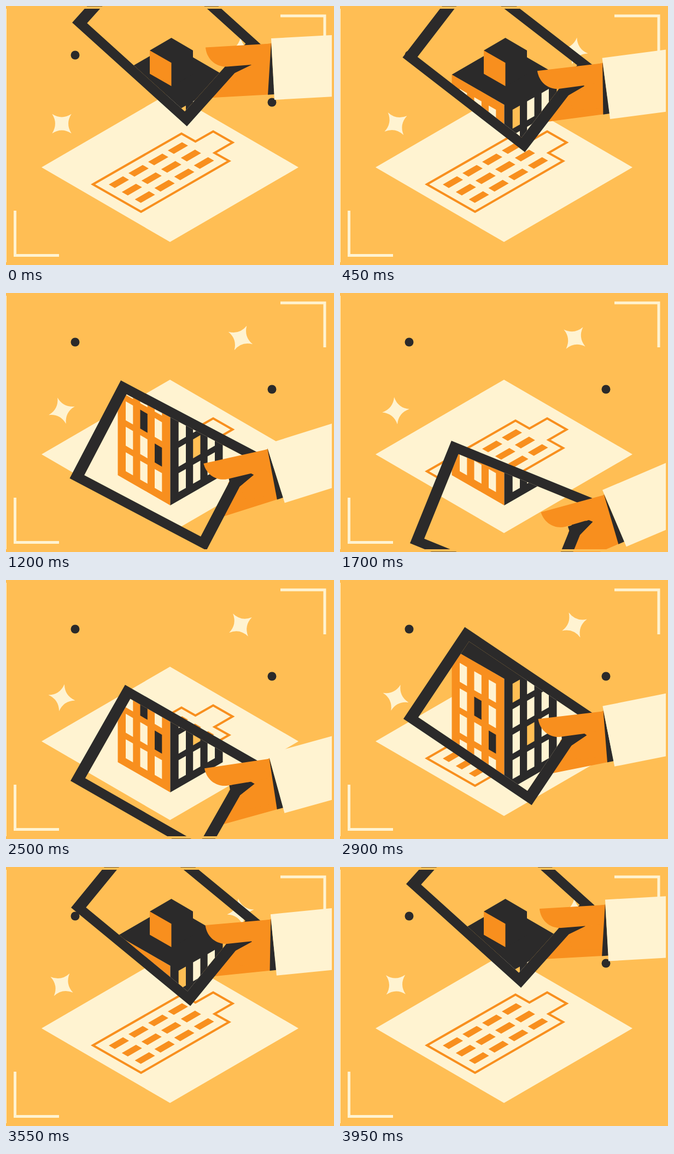
Recreate the animation shown at these times as an HTML page. Size 600 by 472 pixels, loop 4000 ms.

```html
<!DOCTYPE html>
<html lang="en">
<head>
<meta charset="utf-8">
<title>Building in a tablet</title>
<style>
  html, body { margin: 0; width: 100%; height: 100%; overflow: hidden; background: #ffbe54; }
  svg { display: block; width: 600px; height: 472px; }
  .sun { fill: #ffbe54; }
  .cream { fill: #fff3d1; }
  .orange { fill: #f88f1e; }
  .dark { fill: #2b2a2a; }
  .line { fill: none; stroke: #f88f1e; stroke-width: 4; }
  .bracket { fill: none; stroke: #fff3d1; stroke-width: 5; }
</style>
</head>
<body>
<svg viewBox="0 0 600 472">
  <defs>
    <clipPath id="stage"><rect width="596" height="472"/></clipPath>
    <clipPath id="lens"><rect id="lensBox" x="21" y="-184" width="240.5" height="166.5"/></clipPath>
  </defs>
  <rect class="sun" width="600" height="472"/>
  <rect class="cream" y="5" width="1" height="462"/>
  <path class="bracket" d="M502 18H583V99"/>
  <path class="bracket" d="M16.5 373V454.5H97"/>

  <polygon class="cream" points="65,294 300,158 535,294 300,430"/>
  <polygon class="line" points="159,325 321,232.5 346.5,247 379,228.5 414.5,248.7 381.5,267.7 408,282.5 247,375"/>
  <g id="plan" class="orange"></g>

  <g clip-path="url(#lens)">
    <rect class="sun" width="600" height="472"/>
    <polygon class="cream" points="65,294 300,158 535,294 535,301.5 300,437.5 65,301.5"/>
    <polygon class="orange" points="204.5,125 300.5,180 300.5,387 204.5,332"/>
    <polygon class="dark" points="204.5,125 300.5,69.5 396.5,125 396.5,332 300.5,387 300.5,180"/>
    <polygon class="dark" points="263,81 302.5,58 342,81 342,124 302.5,147 263,124"/>
    <polygon class="orange" points="263,81 302.5,103.5 302.5,146 263,123.5"/>
    <g id="panes"></g>
  </g>

  <circle class="dark" cx="126.5" cy="89.5" r="8"/>
  <circle class="dark" cx="486.5" cy="175.5" r="8"/>
  <path id="starLeft" class="cream"/>
  <path id="starRight" class="cream"/>

  <g clip-path="url(#stage)">
    <g id="tablet">
      <g transform="rotate(-42) translate(-121 -30.3)">
        <polygon class="orange" points="485,68 440,75 400,110 374,167.3 480,161.5 488,150"/>
      </g>
      <path class="dark" fill-rule="evenodd"
        d="M0 0V-201.5H282.5V0ZM21 -17.5H261.5V-184H21Z"/>
      <g transform="rotate(-42) translate(-121 -30.3)">
        <polygon class="dark" points="403,100 443,102 449,107.5 418,122.5 402,128"/>
        <polygon class="orange" points="449,107.5 418,122.5 425,150 486,150 486,68 455,85"/>
        <path id="thumb" class="orange" d="M365 75.5C367 97 384 111.5 404 110.5L449 107L485 103V68.5Z"/>
        <polygon class="dark" points="485,66 491,161 479,161.7"/>
        <polygon class="cream" points="485,59 800,41.8 800,154.2 491,171"/>
      </g>
    </g>
  </g>
  <rect class="sun" x="1" y=".6" width="599" height="4.4"/>
  <rect class="sun" x="1" y="467" width="599" height="4.4"/>
</svg>
<script>
const LOOP = 4000, STEP = 50, SLOPE = 0.5745;

// time, x and y of the tablet's lower left corner, tablet angle, thumb lift
const keys = [
  [0, 121, 30.3, 42, 0],
  [550, 113, 115, 36.4, 1.4],
  [800, 112, 195, 33, 2.6],
  [1100, 114.5, 309.5, 28.9, 4.6],
  [1700, 128, 456, 22.1, 8],
  [1900, 130, 467, 21.8, 8.6],
  [2100, 128, 455, 23.6, 8.7],
  [2300, 122.5, 418, 26.8, 8.2],
  [2500, 118, 366, 29.7, 7.3],
  [2900, 116, 253, 33.85, 4.8],
  [3300, 117, 129.5, 37.4, 2],
  [3550, 119, 74, 39.4, 1]
];

const byId = id => document.getElementById(id);

function addPolygon(parent, points, kind) {
  const shape = document.createElementNS("http://www.w3.org/2000/svg", "polygon");
  shape.setAttribute("points", points.map(p => p.join()).join(" "));
  if (kind) shape.setAttribute("class", kind);
  parent.append(shape);
}

function drawPlan() {
  const a = 13, b = 5.5;
  for (let row = 0; row < 3; row++) {
    for (let col = 0; col < 4; col++) {
      const cx = 206.5 + 36 * col + 23.8 * row;
      const cy = 321 - 20.7 * col + 13.6 * row;
      const corner = (u, v) => [cx + u + v, cy + (v - u) * SLOPE];
      addPolygon(byId("plan"), [corner(-a, -b), corner(a, -b), corner(a, b), corner(-a, b)]);
    }
  }
}

function drawPanes() {
  const leftDark = ["1,1", "2,2"], rightLit = ["2,0", "1,2"];
  for (let row = 0; row < 4; row++) {
    for (let col = 0; col < 3; col++) {
      const x = 219 + 26.5 * col, w = 13.3, h = 34.5;
      const y = 151 + 46.4 * row + 26.5 * SLOPE * col;
      const pane = [[x, y], [x + w, y + w * SLOPE], [x + w, y + w * SLOPE + h], [x, y + h]];
      const id = col + "," + row;
      addPolygon(byId("panes"), pane, leftDark.includes(id) ? "dark" : "cream");
      addPolygon(byId("panes"), pane.map(p => [601 - p[0], p[1]]),
        rightLit.includes(id) ? "sun" : "cream");
    }
  }
}

function keyAt(i) {
  const n = keys.length, turn = Math.floor(i / n);
  const [t, ...values] = keys[i - turn * n];
  return [t + turn * LOOP, ...values];
}

// Smooth cyclic curve through the keys, flat at turning points
function tangent(i, c) {
  const a = keyAt(i - 1), b = keyAt(i), d = keyAt(i + 1);
  return (b[c] - a[c]) * (d[c] - b[c]) <= 0 ? 0 : (d[c] - a[c]) / (d[0] - a[0]);
}

function pose(t) {
  let i = keys.length - 1;
  while (keys[i][0] > t) i--;
  const a = keyAt(i), b = keyAt(i + 1), span = b[0] - a[0], s = (t - a[0]) / span;
  return [1, 2, 3, 4].map(c => {
    const r = 1 - s;
    return a[c] * (1 + 2 * s) * r * r + b[c] * s * s * (3 - 2 * s)
      + span * (tangent(i, c) * s * r * r - tangent(i + 1, c) * s * s * r);
  });
}

const place = (id, transform) => byId(id).setAttribute("transform", transform);

function frame() {
  const t = Math.floor(performance.now() / STEP) * STEP % LOOP;
  const [x, y, angle, lift] = pose(t);
  const move = `translate(${x} ${y}) rotate(${angle})`;
  place("tablet", move);
  place("lensBox", move);
  place("thumb", `rotate(${lift} 485 70)`);
  const spin = 90 * t / LOOP;
  place("starLeft", `translate(102 214.5) rotate(${spin + 45})`);
  place("starRight", `translate(429 82) rotate(${spin})`);
  requestAnimationFrame(frame);
}

for (const id of ["starLeft", "starRight"]) {
  byId(id).setAttribute("d", "M0 -25Q4.5 -4.5 25 0Q4.5 4.5 0 25Q-4.5 4.5 -25 0Q-4.5 -4.5 0 -25Z");
}
drawPlan();
drawPanes();
frame();
</script>
</body>
</html>
```
